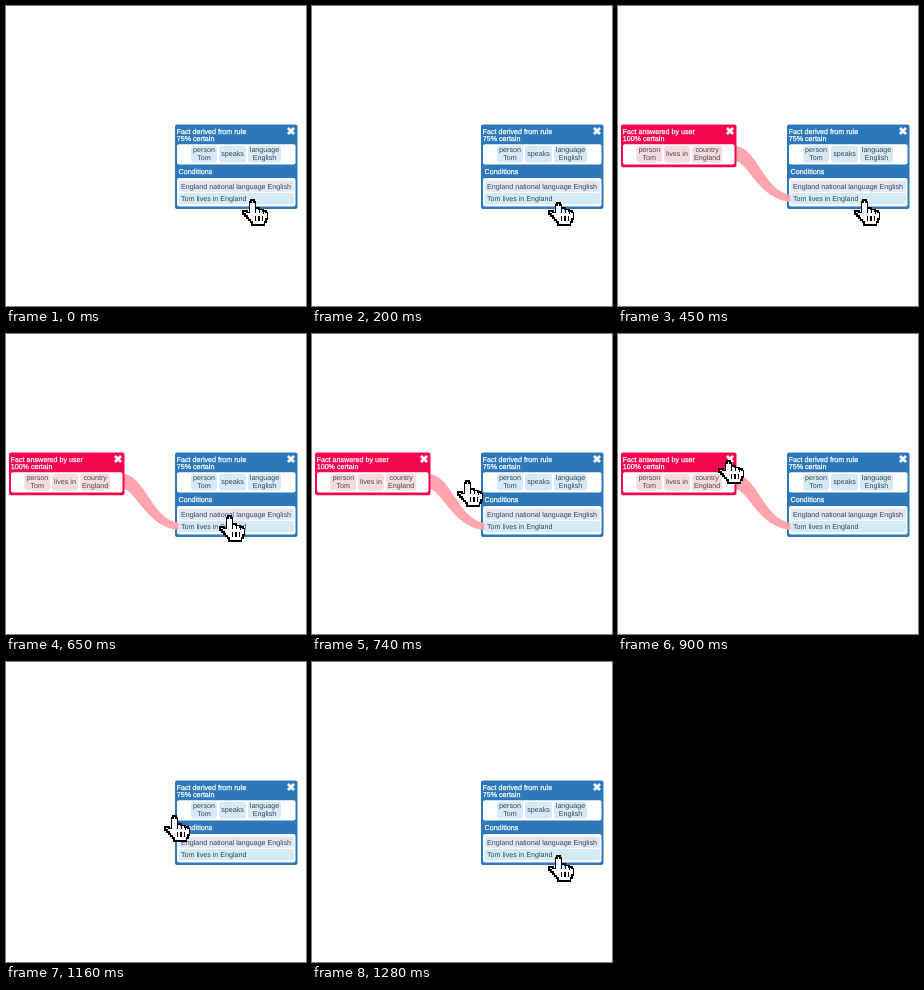
Write an HTML page that moves like this. It is 300x300 px and loops after 1.48 s.

```html
<!DOCTYPE html>
<html lang="en">
<head>
<meta charset="utf-8">
<title>Rule explanation</title>
<style>
  html, body { margin: 0; width: 100%; height: 100%; overflow: hidden; background: #fff; }
  svg { display: block; width: 100vw; height: 100vh; }
  text {
    font: 7.15px "Liberation Sans", Arial, Helvetica, sans-serif;
    text-rendering: geometricPrecision;
  }
  .title { fill: #fff; stroke: #fff; stroke-width: .25px; }
  .label { text-anchor: middle; }
  .close { fill: none; stroke: #fff; stroke-width: 2.7px; }
  .hand { fill: #fff; stroke: #000; stroke-width: 1.5px; shape-rendering: crispEdges; }
</style>
</head>
<body>
<svg id="stage" viewBox="0 0 300 300" xmlns="http://www.w3.org/2000/svg"></svg>
<script>
const LOOP = 1480, STEP = 30;
const HOME = [236, 193], CLOSE = [100, 122.5];

const blue = { main: '#2c78bb', chip: '#d6e9f4', ink: '#35475a' };
const red = { main: '#f3064e', chip: '#f3dcdf', ink: '#55434b' };

const box = (x, y, w, h, fill, r = 2) =>
  `<rect x="${x}" y="${y}" width="${w}" height="${h}" rx="${r}" fill="${fill}"/>`;

const text = (x, y, str, cls, fill = '') =>
  `<text x="${x}" y="${y}" class="${cls}" ${fill && `fill="${fill}"`}>${str}</text>`;

function chip(x, w, lines, c) {
  const y = lines.length > 1 ? 146 : 149.7;
  return box(x, 140, w, 16.5, c.chip, 3) +
    lines.map((s, i) => text(x + w / 2, y + i * 7.5, s, 'label', c.ink)).join('');
}

function panel(x, w, h, c, titles, chips) {
  return box(x, 118.5, w, h, c.main) +
    titles.map((s, i) => text(x + 1.7, 127.8 + i * 7.5, s, 'title')).join('') +
    `<path class="close" d="M${x + w - 9.5} 122l6 6m0-6l-6 6"/>` +
    box(x + 2, 138.3, w - 4, 20.2, '#fff') +
    chips.map(([cx, cw, ...lines]) => chip(cx, cw, lines, c)).join('');
}

function condition(y, str, fill) {
  return box(173, y, 115, 11, fill, 3) + text(175, y + 8, str, '', blue.ink);
}

const derived = panel(169, 122.5, 84.5, blue,
  ['Fact derived from rule', '75% certain'],
  [[185, 26, 'person', 'Tom'], [213, 27, 'speaks'], [242, 33, 'language', 'English']]) +
  text(172.5, 167.6, 'Conditions', 'title') +
  box(171, 172, 118.5, 28.5, '#f7fafd') +
  condition(174.8, 'England national language English', '#dfe7f3') +
  condition(187, 'Tom lives in England', '#d6eaf5');

const answered = panel(3, 115.5, 42.7, red,
  ['Fact answered by user', '100% certain'],
  [[18.3, 26, 'person', 'Tom'], [46, 26, 'lives in'], [74.2, 30, 'country', 'England']]);

// Ribbon that narrows from the answer towards its condition.
const link = '<path d="M118 140C140 143 146 185 172.5 189V196C141 193 131 158 118 155Z" fill="#ffa5b0"/>';

// Outline of the pointing hand; tip is the top of the index finger.
const handPath = tip =>
  `M9 ${tip}H12V${tip + 2}H13.5V9H17V10.5H21V12H24V13.5H25.5V20H24V23H22.5V26H10V23H8.5` +
  `V21H6.5V19H5V17H3V15H1V12H5V13.5H7.5V${tip + 2}H9Z` +
  'M13.5 9V13.5M17.5 10.5V14M21.5 12V14.5M13.5 17V22M17 17V22M20.5 17V22';

const stage = document.getElementById('stage');
stage.innerHTML = derived +
  `<g id="answer">${link}${answered}</g>` +
  '<path id="hand" class="hand"/>';
const answer = document.getElementById('answer');
const hand = document.getElementById('hand');

// Progress from 0 to 1 in n even jumps, the first one at start.
const steps = (t, start, n) =>
  Math.min(n, Math.max(0, Math.floor((t - start) / STEP) + 1)) / n;

const within = (t, from, to) => t >= from && t < to;

function draw(t) {
  answer.setAttribute('opacity', t < 1000 ? steps(t, 300, 6) : 0);
  const away = steps(t, 650, 6) - steps(t, 1100, 7);
  const [x, y] = HOME.map((h, i) => Math.round(h + (CLOSE[i] - h) * away));
  const pressed = within(t, 200, 300) || within(t, 900, 1000);
  hand.setAttribute('transform', `translate(${x} ${y})`);
  hand.setAttribute('d', handPath(pressed ? 4 : 1));
}

const begin = performance.now();
function tick() {
  draw((performance.now() - begin) % LOOP);
  requestAnimationFrame(tick);
}
tick();
</script>
</body>
</html>
```
